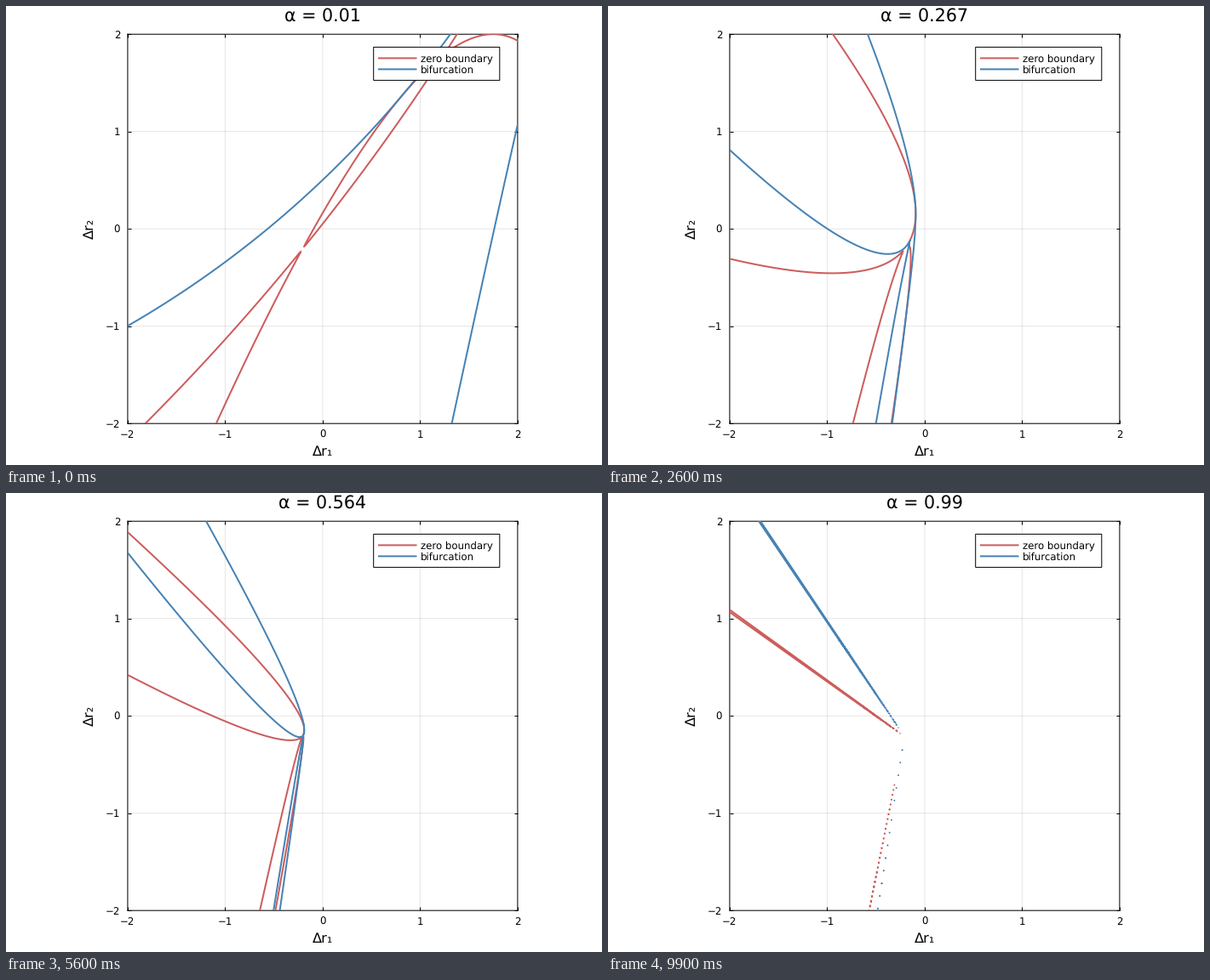
Recreate the animation shown at these times as a matplotlib script. Size 700 px wide and 540 px high, loop 10000 ms.

```python
import numpy as np
import matplotlib.pyplot as plt
from matplotlib.animation import FuncAnimation
from matplotlib.lines import Line2D
from matplotlib.patches import Rectangle
from matplotlib.transforms import Affine2D

W, H, DPI = 700, 540, 100
RED, BLUE = "indianred", "steelblue"
FRAMES, INTERVAL = 100, 100
PT = 72 / DPI

plt.rcParams["font.family"] = "DejaVu Sans"
plt.rcParams["text.hinting"] = "none"

# Two-species model: each growth rate is linear plus quadratic in densities (t, s)
#   u = (1-k)(a t + e s) + k(-t^2 + p t s - q s^2)
#   v = (1-k)(c t + g s) + k(m t^2 + w t s - s^2)
A, C, M = 0.4815, 0.5939, 0.7188
E, G, Q = 0.1633, 0.3003, 0.2015
P, WX = -0.6267, -1.0681
X0, Y0 = -0.2085, -0.2095

axis = np.linspace(-2, 2, 401)
U, V = np.meshgrid(axis - X0, axis - Y0)


def mul(f, g):
    out = [0.0] * (len(f) + len(g) - 1)
    for i, x in enumerate(f):
        for j, y in enumerate(g):
            out[i + j] = out[i + j] + x * y
    return out


def add(f, g):
    return [x + y for x, y in zip(f, g)]


def zero_boundary(k):
    """Vanishes where one of the densities is zero."""
    l2 = (1 - k) ** 2
    kt, ks = C + M * A, E - Q * G
    wt, ws = V + M * U, U - Q * V
    first = l2 * kt * (kt * U - A * wt) + k * wt**2
    second = l2 * ks * (ks * V - G * ws) + k * ws**2
    return first * second


def bifurcation(k):
    """Discriminant of the quartic in s left after eliminating t."""
    l = 1 - k
    x = [V + M * U, -l * (G + M * E), k * (1 + M * Q)]
    y = [l * (C + M * A), k * (WX + M * P)]
    z = add(mul([l * A, k * P], [-V, l * G, -k]),
            mul([l * C, k * WX], [U, -l * E, k * Q]))
    r0, r1, r2, r3, r4 = add([k * f for f in mul(x, x)], mul(y, z))
    d0 = r2**2 - 3 * r3 * r1 + 12 * r4 * r0
    d1 = (2 * r2**3 - 9 * r3 * r2 * r1 + 27 * r3**2 * r0
          + 27 * r4 * r1**2 - 72 * r4 * r2 * r0)
    # Two roots may share s but not t: divide that factor out
    s = -y[0] / y[1]
    shared = x[0] + x[1] * s + x[2] * s**2
    return (4 * d0**3 - d1**2) / shared**2


fig = plt.figure(figsize=(W / DPI, H / DPI), dpi=DPI, facecolor="white")
px = Affine2D().scale(1 / W, -1 / H).translate(0, 1) + fig.transFigure


def label(x, y, s, size, ha="center", **kw):
    return fig.text(x, y, s, fontsize=size * PT, ha=ha, va="baseline",
                    transform=px, zorder=5, **kw)


SIDE, LEFT, TOP = 458, 142.9, 33.2
ax = fig.add_axes([LEFT / W, 1 - (TOP + SIDE) / H, SIDE / W, SIDE / H])
ax.set(xlim=(-2, 2), ylim=(-2, 2))
ticks = range(-2, 3)
ax.set_xticks(ticks, [])
ax.set_yticks(ticks, [])
ax.tick_params(direction="in", length=4 * PT, width=PT, top=True, right=True)
ax.grid(color="black", alpha=0.1, lw=PT, snap=False)
ax.set_axisbelow(True)
for spine in ax.spines.values():
    spine.set(linewidth=PT, snap=False)

for n in ticks:
    s = str(n).replace("-", "\u2212")
    pos = (n + 2) * SIDE / 4
    label(LEFT + pos, 507.6, s, 11.75)
    label(134.2, TOP + SIDE - pos + 4.4, s, 11.75, ha="right")

label(372, 528.6, "Δr₁", 16.2)
label(103.2, 262, "Δr₂", 16.2, rotation=90, rotation_mode="anchor")
title = label(372, 18.2, "", 20.6)

fig.add_artist(Rectangle((431.7, 48.4), 148.1, 39, fc="white", ec="black",
                         lw=PT, transform=px, zorder=3, snap=False))
for y, color, s in ((61.4, RED, "zero boundary"), (74.4, BLUE, "bifurcation")):
    fig.add_artist(Line2D([438, 481.5], [y, y], color=color, lw=2 * PT,
                          transform=px, zorder=4, snap=False))
    label(487.2, y + 4.4, s, 11.75, ha="left")

curves = []


def draw(i):
    while curves:
        curves.pop().remove()
    k = 0.01 + 0.98 * i / (FRAMES - 1)
    for field, color in ((zero_boundary, RED), (bifurcation, BLUE)):
        curve = ax.contour(axis, axis, field(k), levels=[0], colors=[color],
                           linewidths=2 * PT, zorder=3)
        curve.set(capstyle="round", joinstyle="round")
        curves.append(curve)
    title.set_text(f"α = {round(k, 3)}")
    return [title]


anim = FuncAnimation(fig, draw, frames=FRAMES, interval=INTERVAL,
                     init_func=lambda: [title], repeat=True, repeat_delay=0)
plt.show()
```
